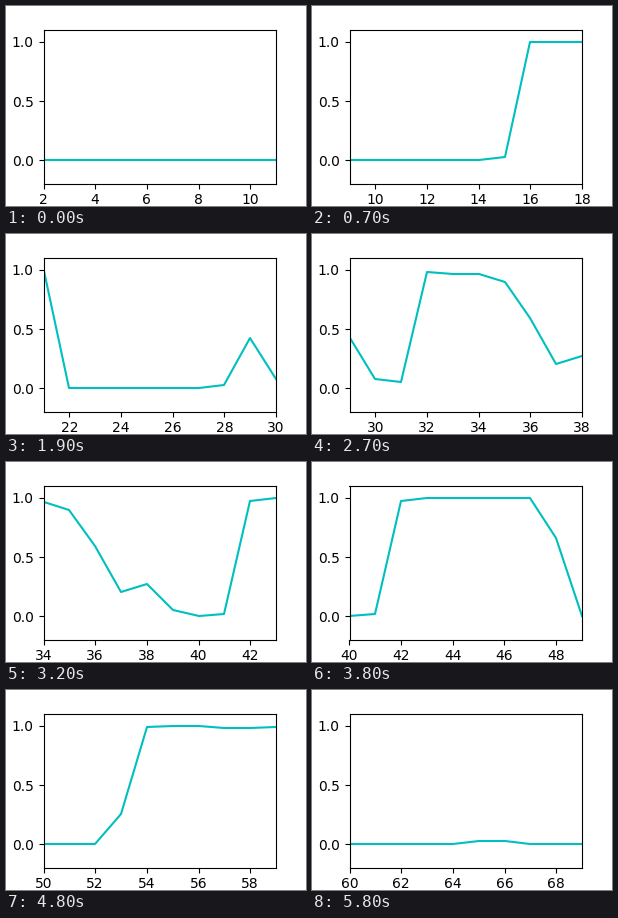
A matplotlib script that plays this animation: 300 by 200 pixels, repeating every 5.9 s.

```python
import matplotlib.pyplot as plt
import numpy as np
from matplotlib.animation import FuncAnimation
from matplotlib.ticker import MultipleLocator

plt.rcParams["font.family"] = "DejaVu Sans"

WINDOW = 10
FRAMES = 59
START = 2

# rise centre, rise steepness, fall centre, fall steepness
PLATEAUS = [
    (15.35, 10, 21.5, 12),
    (31.39, 7.5, 36.2, 1.85),
    (41.52, 7.3, 48.1, 6.6),
    (53.18, 6, 59.5, 11),
]

# centre, height, width
BUMPS = [
    (19.5, -0.014, 1.0),
    (29.13, 0.445, 0.47),
    (33.2, -0.03, 0.7),
    (38.1, 0.24, 0.5),
    (57.4, -0.022, 0.8),
    (65.4, 0.033, 0.75),
]


def sigmoid(t):
    return (1 + np.tanh(t / 2)) / 2


def plateau(x, rise, k_up, fall, k_down):
    return sigmoid(k_up * (x - rise)) * sigmoid(k_down * (fall - x))


def bump(x, centre, height, width):
    return height * np.exp(-((x - centre) / width) ** 2 / 2)


x = np.arange(START, START + FRAMES + WINDOW - 1)
y = sum(plateau(x, *p) for p in PLATEAUS) + sum(bump(x, *b) for b in BUMPS)

fig, ax = plt.subplots(figsize=(3, 2), dpi=100)
ax.set_ylim(-0.2, 1.1)
ax.xaxis.set_major_locator(MultipleLocator(2))
ax.yaxis.set_major_locator(MultipleLocator(0.5))
ax.tick_params(axis="x", pad=3)
line, = ax.plot([], [], color="c", lw=1.5, snap=True)


def update(i):
    view = slice(i, i + WINDOW)
    line.set_data(x[view], y[view])
    ax.set_xlim(x[i], x[i + WINDOW - 1])
    return line,


anim = FuncAnimation(fig, update, frames=FRAMES, interval=100,
                     repeat=True, repeat_delay=0)
plt.show()
```
